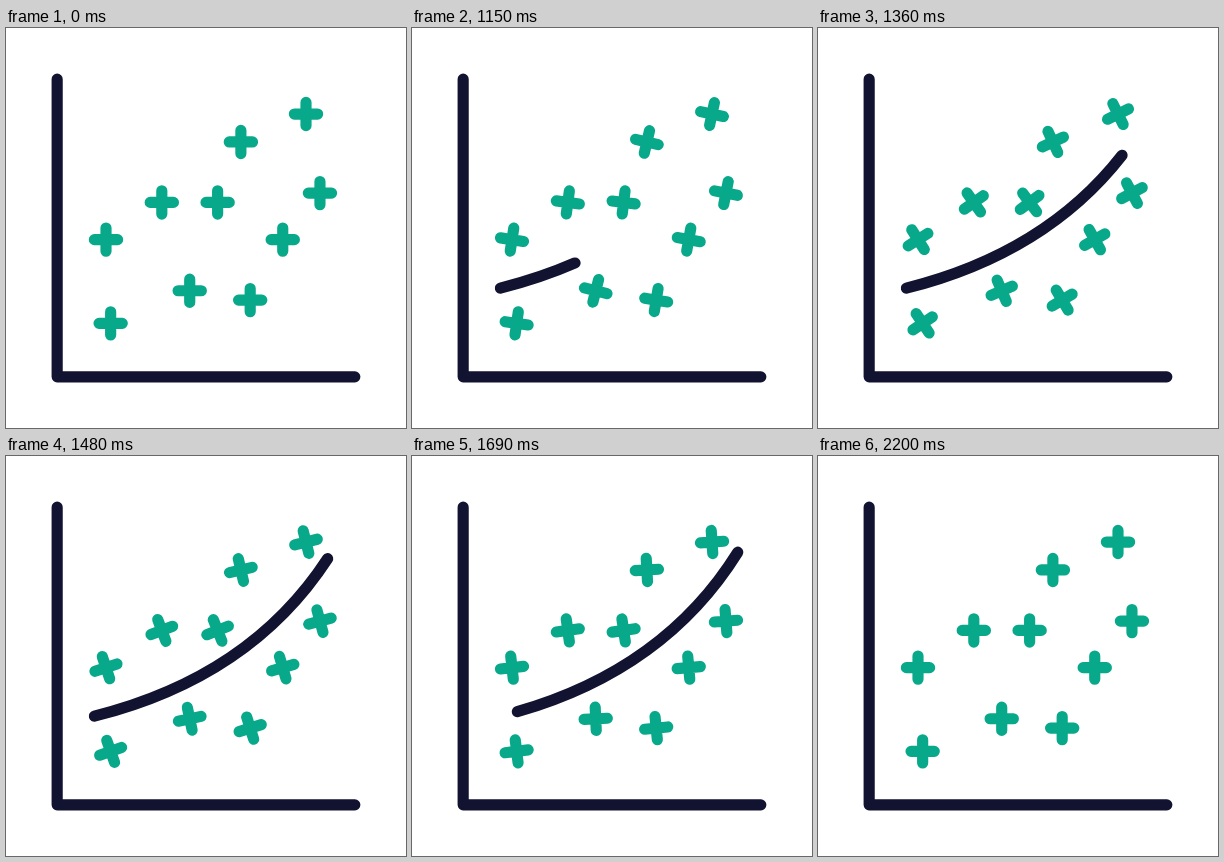
Recreate the animation shown at these times as an HTML page with a canvas. Size 400 by 400 pixels, loop 2.23 s.

```html
<!DOCTYPE html>
<html lang="en">
<head>
<meta charset="utf-8">
<title>Scatter plot trend line</title>
<style>
  html, body { margin: 0; width: 100%; height: 100%; overflow: hidden; background: #fff; }
  canvas { display: block; width: 400px; height: 400px; }
</style>
</head>
<body>
<canvas id="stage" width="400" height="400"></canvas>
<script>
const ctx = document.getElementById('stage').getContext('2d');
const LOOP = 2230, HOLD = 1030, STEP = 30;
const INK = '#121331', GREEN = '#08a88a';
const UNIT = 400 / 430;

// Ordered from the quickest turn to the slowest: 31 to 40 steps.
const crosses = [
  [197.5, 282.5], [252.5, 122.5], [322.5, 92.5], [337.5, 177.5], [297.5, 227.5],
  [262.5, 292.5], [107.5, 227.5], [112.5, 317.5], [167.5, 187.5], [227.5, 187.5]
];
const ARM = 12.5;

const trend = { from: [95, 279.7], ctrl: [267.3, 236.5], to: [350.2, 103.4] };

function curvePoint(t) {
  const r = 1 - t;
  return [0, 1].map(i =>
    r * r * trend.from[i] + 2 * r * t * trend.ctrl[i] + t * t * trend.to[i]);
}

function curveLength(steps = 400) {
  let total = 0, last = curvePoint(0);
  for (let i = 1; i <= steps; i++) {
    const p = curvePoint(i / steps);
    total += Math.hypot(p[0] - last[0], p[1] - last[1]);
    last = p;
  }
  return total;
}
const trendLength = curveLength();

// Cubic easing with handles (x1, 0) and (x2, 1).
function easing(x1, x2) {
  return x => {
    if (x <= 0) return 0;
    if (x >= 1) return 1;
    let lo = 0, hi = 1;
    for (let i = 0; i < 30; i++) {
      const s = (lo + hi) / 2, r = 1 - s;
      if (3 * x1 * s * r * r + 3 * x2 * s * s * r + s * s * s < x) lo = s;
      else hi = s;
    }
    return lo * lo * (3 - 2 * lo);
  };
}
const easeGrow = easing(0.36, 0.225);
const easeShrink = easing(0.43, 0.16);
const easeTurn = easing(0.33, 0.04);

function drawAxes() {
  ctx.strokeStyle = INK;
  ctx.beginPath();
  ctx.moveTo(55, 55);
  ctx.lineTo(55, 375);
  ctx.lineTo(375, 375);
  ctx.stroke();
}

function drawCross([x, y], angle) {
  ctx.save();
  ctx.translate(x, y);
  ctx.rotate(angle);
  ctx.strokeStyle = GREEN;
  ctx.beginPath();
  ctx.moveTo(-ARM, 0);
  ctx.lineTo(ARM, 0);
  ctx.moveTo(0, -ARM);
  ctx.lineTo(0, ARM);
  ctx.stroke();
  ctx.restore();
}

function drawTrend(start, end) {
  if (end - start < 0.0005) return;
  ctx.save();
  ctx.strokeStyle = INK;
  ctx.setLineDash([(end - start) * trendLength, 2 * trendLength]);
  ctx.lineDashOffset = -start * trendLength;
  ctx.beginPath();
  ctx.moveTo(...trend.from);
  ctx.quadraticCurveTo(...trend.ctrl, ...trend.to);
  ctx.stroke();
  ctx.restore();
}

function render(now) {
  const time = now % LOOP;
  const step = time < HOLD ? 0 : 1 + Math.floor((time - HOLD) / STEP);

  ctx.setTransform(1, 0, 0, 1, 0, 0);
  ctx.fillStyle = '#fff';
  ctx.fillRect(0, 0, 400, 400);
  ctx.scale(UNIT, UNIT);
  ctx.lineWidth = 12;
  ctx.lineCap = ctx.lineJoin = 'round';

  crosses.forEach((pos, i) => drawCross(pos, easeTurn(step / (31 + i)) * Math.PI / 2));
  drawTrend(easeShrink((step - 20) / 20), easeGrow(step / 20));
  drawAxes();
}

function tick(now) {
  render(now);
  requestAnimationFrame(tick);
}
render(0);
requestAnimationFrame(tick);
</script>
</body>
</html>
```
